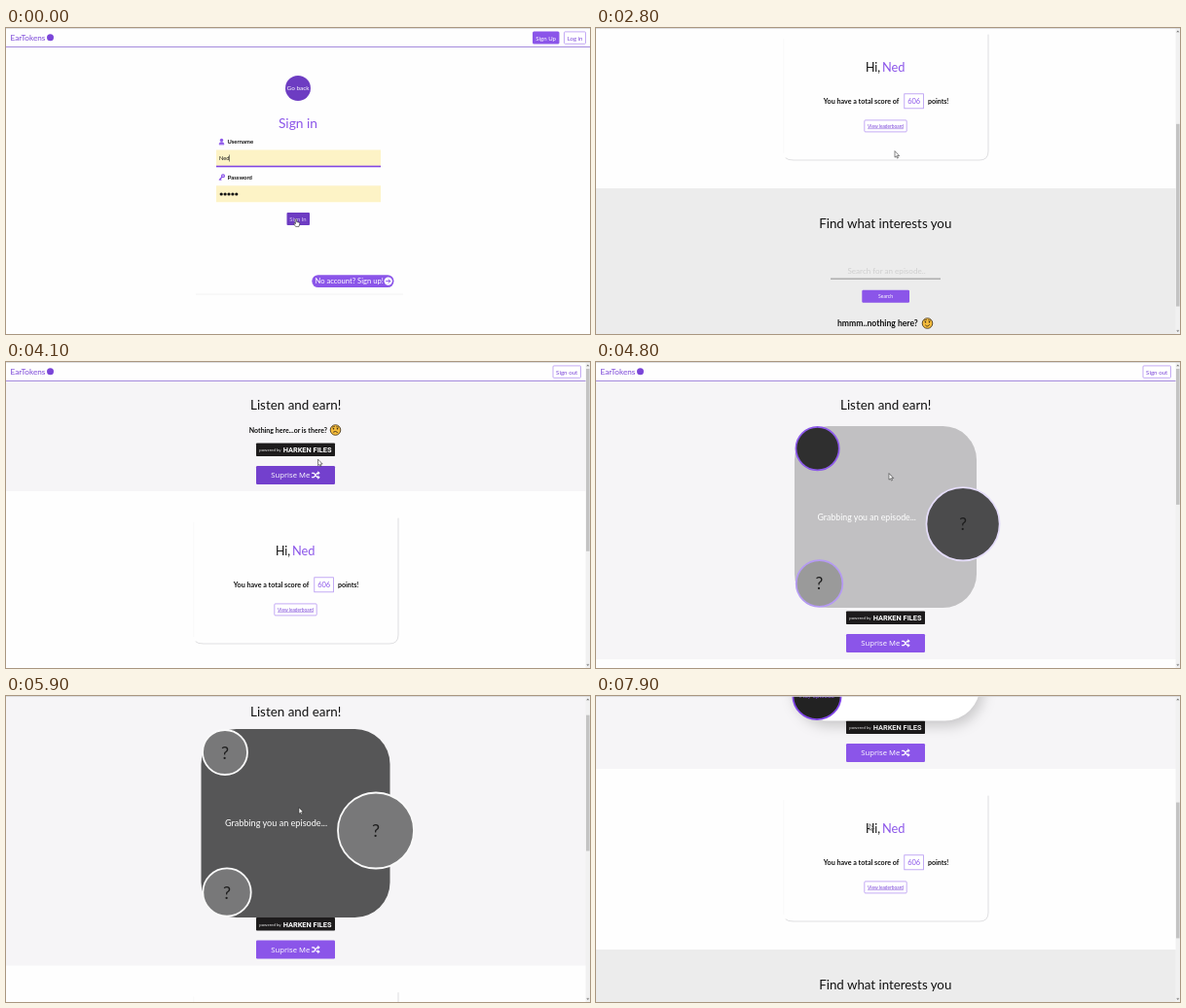
An HTML page that plays this animation: 600 by 315 pixels, repeating every 8 s.

```html
<!DOCTYPE html>
<html lang="en">
<head>
<meta charset="utf-8">
<title>Podcast rewards</title>
<style>
  html, body { margin: 0; width: 100%; height: 100%; overflow: hidden; background: #fefefe; }
  svg { display: block; width: 600px; height: 315px; font-family: Lato, sans-serif; }
  .loaded { filter: drop-shadow(3px 5px 7px #0003); }
</style>
</head>
<body>
<svg id="stage" viewBox="0 0 600 315"></svg>
<script>
const LOOP = 8000, STEP = 100, GROWTH = 173;
const PURPLE = '#8b55e9', DEEP = '#6d3cc2', INK = '#111';

// Markup helpers
const text = (x, y, str, size, fill = INK, extra = '') =>
  `<text x="${x}" y="${y}" font-size="${size}" fill="${fill}" ${extra}>${str}</text>`;
const mid = (x, y, str, size, fill, extra = '') =>
  text(x, y, str, size, fill, `text-anchor="middle" ${extra}`);
const rect = (x, y, w, h, fill, extra = '') =>
  `<rect x="${x}" y="${y}" width="${w}" height="${h}" fill="${fill}" ${extra}/>`;
const circle = (x, y, r, fill, extra = '') =>
  `<circle cx="${x}" cy="${y}" r="${r}" fill="${fill}" ${extra}/>`;
const path = (d, stroke, width = 1, fill = 'none') =>
  `<path d="${d}" stroke="${stroke}" stroke-width="${width}" fill="${fill}" stroke-linecap="round" stroke-linejoin="round"/>`;
const outline = (x, y, w, h, color = '#b596f2', r = 1) =>
  rect(x, y, w, h, '#fff', `stroke="${color}" stroke-width=".8" rx="${r}"`);
const group = (id, body, extra = '') => `<g id="${id}" ${extra}>${body}</g>`;
const bold = 'font-weight="700"';

const header = width =>
  rect(0, 0, width, 19, '#fefefe') + rect(0, 19, width, 1, '#a58bdd') +
  text(4.5, 13, 'EarTokens', 8.2, '#7a45d8') + circle(45.5, 9.7, 3.5, '#7a45d8');

const face = (x, y, mouth) =>
  circle(x, y, 5.3, '#f6bd3c', 'stroke="#3b2c18" stroke-width=".8"') +
  circle(x - 2, y - 1.2, .8, '#2c2013') + circle(x + 2, y - 1.2, .8, '#2c2013') +
  path(`M${x - 3} ${y - 3}l2 -.5M${x + 1} ${y - 3.2}l2 .3`, '#3b2c18', .7) +
  path(`M${x - 2} ${y + 2}${mouth}`, '#3b2c18', .9);

const login =
  rect(0, 0, 600, 315, '#fefefe') + header(600) +
  rect(541, 3.5, 27.5, 13, PURPLE, 'rx="1.5"') + mid(554.7, 12.5, 'Sign Up', 6.1, '#fff') +
  outline(573.5, 3.9, 22, 12.4) + mid(584.5, 12.5, 'Log in', 6, '#7a45d8') +
  circle(300, 62, 13, DEEP) + mid(300, 64.3, 'Go back', 6.4, '#fff') +
  mid(300, 103, 'Sign in', 13.8, PURPLE) +
  circle(221.5, 115.4, 1.7, PURPLE) + path('M219 119.7q0 -2.2 2.5 -2.2t2.5 2.2z', PURPLE, .6, PURPLE) +
  text(227.5, 119.3, 'Username', 5.9, INK, bold) +
  rect(216, 125.5, 169, 17, '#fdf3c6') + rect(216, 141.7, 169, 1.6, '#8146e2') +
  text(219, 136.3, 'Ned', 5.7) + rect(229.3, 130.5, .6, 7, '#333') +
  circle(223, 152.3, 1.4, 'none', `stroke="${PURPLE}" stroke-width="1.3"`) +
  path('M221.8 153.5l-2.5 2.7h1.6', PURPLE, 1.2) +
  text(227.7, 155.8, 'Password', 5.9, INK, bold) +
  rect(216, 162.3, 169, 17, '#fdf3c6') +
  [0, 1, 2, 3, 4].map(i => circle(221.2 + i * 3.9, 171, 1.6, INK)).join('') +
  rect(288.5, 190, 23.5, 13, DEEP, 'rx="1"') + mid(300, 198.6, 'Sign In', 5.9, '#d9c9f6') +
  rect(314.3, 254.2, 84.2, 12.8, PURPLE, 'rx="6.4"') +
  text(317.5, 263.3, 'No account? Sign up!', 7.6, '#fff', '') +
  circle(392.7, 260.6, 4.2, '#fff') + path('M390.6 260.6h4M393 258.8l1.8 1.8l-1.8 1.8', PURPLE, 1) +
  rect(195, 273.7, 213, .7, '#ececec');

const shuffle = path('M314.5 114.3h1.8l3.4 4.4h2M314.5 118.7h1.8l3.4 -4.4h2', '#fff', 1.2) +
  path('M320.8 113l1.4 1.3l-1.4 1.3zM320.8 117.4l1.4 1.3l-1.4 1.3z', '#fff', .6, '#fff');

// Parts that move down once the episode card opens
const lower =
  rect(257, 83.5, 81, 13.5, '#1d1b1c', 'rx=".8"') +
  text(260.3, 92.3, 'powered by', 4.3, '#eee') +
  text(284.7, 93, 'HARKEN FILES', 7.4, '#fff', 'font-weight="700" font-family="Roboto, sans-serif"') +
  `<rect id="surprise" x="257" y="107" width="81" height="19" rx="1.2"/>` +
  text(272.3, 119.4, 'Suprise Me', 7.7, '#fff', 'font-family="Open Sans, sans-serif"') + shuffle +
  path('M403 161V281q0 9 -9 9H203q-6 0 -8 -2', '#dcdcde', .9) + rect(192.5, 165, .6, 118, '#f5f5f6') +
  text(277, 199.3, 'Hi,', 12.4) + text(294, 199.3, 'Ned', 12.8, PURPLE) +
  text(233.8, 231.8, 'You have a total score of', 7.15, INK, bold) +
  outline(316.8, 221.8, 19.8, 15, '#b596f2', 0) + mid(326.7, 232, '606', 7.5, PURPLE) +
  text(341, 231.8, 'points!', 7, INK, bold) +
  outline(275.8, 248.9, 43.4, 12) +
  mid(297.5, 256.6, 'View leaderboard', 4.8, '#7a45d8', 'text-decoration="underline"') +
  rect(0, 319, 596, 190, '#ececec') +
  mid(297.3, 360, 'Find what interests you', 13.3) +
  mid(298.5, 407, 'Search for an episode..', 8.1, '#cfcfcf') + rect(241, 411.7, 113, .8, '#777') +
  rect(273.3, 423.7, 48.7, 13, PURPLE, 'rx="1.2"') + mid(297.6, 432, 'Search', 5.1, '#fff') +
  text(248, 461, 'hmmm..nothing here?', 8.6, INK, bold) + face(340.5, 458, 'q2 2.5 4 -.5');

// Badges: centre, radius, first fill, first border
const badges = [
  [225, 86.5, 23, [38, 38, 38], [128, 70, 232]],
  [380, 167, 39, [70, 70, 70], [226, 218, 250]],
  [227, 230.5, 24.7, [158, 158, 158], [172, 142, 242]]
];
const ring = (x, y, r, i) => circle(x, y, r, '#222', `id="badge${i}" stroke-width="1.8"`) +
  mid(x, y + 6.5, '?', 18, '#1d1d1d', `id="mark${i}"`);
const cardShape = (id, fill) => rect(200.5, 62.5, 194, 194, fill, `id="${id}" rx="36"`);

const loading = cardShape('panel', '#ccc') +
  mid(277.5, 162.7, 'Grabbing you an episode...', 9.1, '#fff') +
  badges.map(([x, y, r], i) => ring(x, y, r, i)).join('');
const ready = `<g class="loaded">${cardShape('result', '#fff')}</g>` +
  badges.map(([x, y, r]) => circle(x, y, r, '#222', 'stroke="#8046e8" stroke-width="1.8"')).join('') +
  mid(227, 232.5, 'Play episode', 6.6, PURPLE);

const home = rect(0, 0, 596, 700, '#fefefe') +
  `<rect id="hero" x="0" y="20" width="596" height="113" fill="#f6f5f7"/>` + header(596) +
  group('signOut', outline(562, 3.9, 28.5, 12.4) + mid(576.2, 12.5, 'Sign out', 6.2, '#7a45d8')) +
  mid(297.7, 49.2, 'Listen and earn!', 13.4) +
  group('hint', text(249.8, 73, 'Nothing here...or is there?', 7, INK, bold) + face(338.5, 70, 'q2 -1.5 4 .3')) +
  group('lower', lower) + group('loading', loading) + group('ready', ready);

const bar = rect(595.5, 0, 4.5, 315, '#f1f1f1') +
  path('M596.8 4l1 -1.2l1 1.2zM596.8 311.5l1 1.2l1 -1.2z', '#666', .3, '#666') +
  `<rect id="thumb" x="596" y="7" width="3.6" fill="#c3c3c3"/>`;

const arrow = path('M0 0V6.2L1.5 4.9L2.5 7.1L3.5 6.6L2.5 4.5H4.3Z', '#333', .6, '#fff');
const hand = path('M-.8 -3q.8 -.9 1.4 0V-.4L3.2 .2Q4 .5 3.8 1.6L3 4.4H-.4L-2.4 1.6q0 -1 1.6 -.2z', '#222', .6, '#fff');

const stage = document.getElementById('stage');
stage.innerHTML = group('login', login) + group('home', home) + group('bar', bar) +
  rect(0, 0, 600, .8, '#d5d5d8') +
  group('cursor', group('arrow', arrow) + group('hand', hand));

const el = {};
stage.querySelectorAll('[id]').forEach(node => el[node.id] = node);

// Tracks: [time, values...]
const cursorTrack = [
  [0, 298, 200], [600, 298, 200], [900, 299, 222], [1100, 303, 190], [1400, 307, 122],
  [1800, 306, 122], [2200, 284, 191], [2300, 284, 191], [2600, 307, 127], [3300, 307, 127],
  [4100, 320.5, 100.5], [4300, 312, 114], [4500, 310, 116], [4800, 301, 115],
  [7400, 301, 115], [7900, 281, 132]
];
const scrollTrack = [
  [0, 0], [2400, 0], [2800, 154], [3200, 190], [3400, 190], [4000, 0],
  [5800, 0], [5900, 28.5], [6200, 94], [7400, 94], [7900, 231]
];

const clamp = v => Math.max(0, Math.min(1, v));
const mix = (a, b, k) => a + (b - a) * k;
const mixRgb = (a, b, k) => `rgb(${a.map((v, i) => Math.round(mix(v, b[i], k)))})`;
const ramp = (t, from, to) => clamp((t - from) / (to - from));
const within = (t, from, to) => t >= from && t < to;

function sample(track, t) {
  const n = track.findIndex(row => row[0] > t);
  if (n < 0) return track[track.length - 1].slice(1);
  const a = track[n - 1], b = track[n];
  return a.slice(1).map((v, i) => mix(v, b[i + 1], ramp(t, a[0], b[0])));
}
const show = (node, on) => node.setAttribute('opacity', Number(on));
const move = (node, x, y) => node.setAttribute('transform', `translate(${x} ${y})`);

function draw(t) {
  const signedIn = t >= 600, open = t >= 4500;
  const [scroll] = sample(scrollTrack, t);
  const [cx, cy] = sample(cursorTrack, t);

  show(el.login, !signedIn);
  show(el.home, signedIn);
  show(el.bar, signedIn);
  show(el.signOut, ramp(t, 900, 1100));
  move(el.home, 0, -scroll);
  move(el.lower, 0, open ? GROWTH : 0);
  el.hero.setAttribute('height', open ? 113 + GROWTH : 113);
  show(el.hint, !open);

  const scale = 301 / (open ? 505 + GROWTH : 505);
  el.thumb.setAttribute('y', 7 + scroll * scale);
  el.thumb.setAttribute('height', 315 * scale);

  const hover = within(t, 1300, 2000) || within(t, 4100, 4500);
  el.surprise.setAttribute('fill', hover ? '#7340cd' : PURPLE);

  // Waiting pulse, then fade to the finished card
  const k = (1 - Math.cos(Math.PI * (t - 4500) / 1400)) / 2;
  const done = ramp(t, 6800, 7200), size = mix(.96, 1, k);
  show(el.loading, open ? 1 - done : 0);
  show(el.ready, done);
  el.loading.setAttribute('transform', `translate(297.5 159.8) scale(${size}) translate(-297.5 -159.8)`);
  el.panel.setAttribute('fill', mixRgb([206, 205, 207], [86, 86, 87], k));
  badges.forEach(([, , , fill, border], i) => {
    el['badge' + i].setAttribute('fill', mixRgb(fill, [120, 120, 121], k));
    el['badge' + i].setAttribute('stroke', mixRgb(border, [250, 250, 250], k));
  });
  show(el.mark0, k > .15);

  const pointing = t < 600 || within(t, 1300, 2000) || within(t, 4200, 4500);
  move(el.cursor, cx, cy);
  show(el.arrow, !pointing);
  show(el.hand, pointing);
}

const start = performance.now();
function tick() {
  const t = (performance.now() - start) % LOOP;
  draw(Math.floor(t / STEP) * STEP);
  requestAnimationFrame(tick);
}
tick();
</script>
</body>
</html>
```
